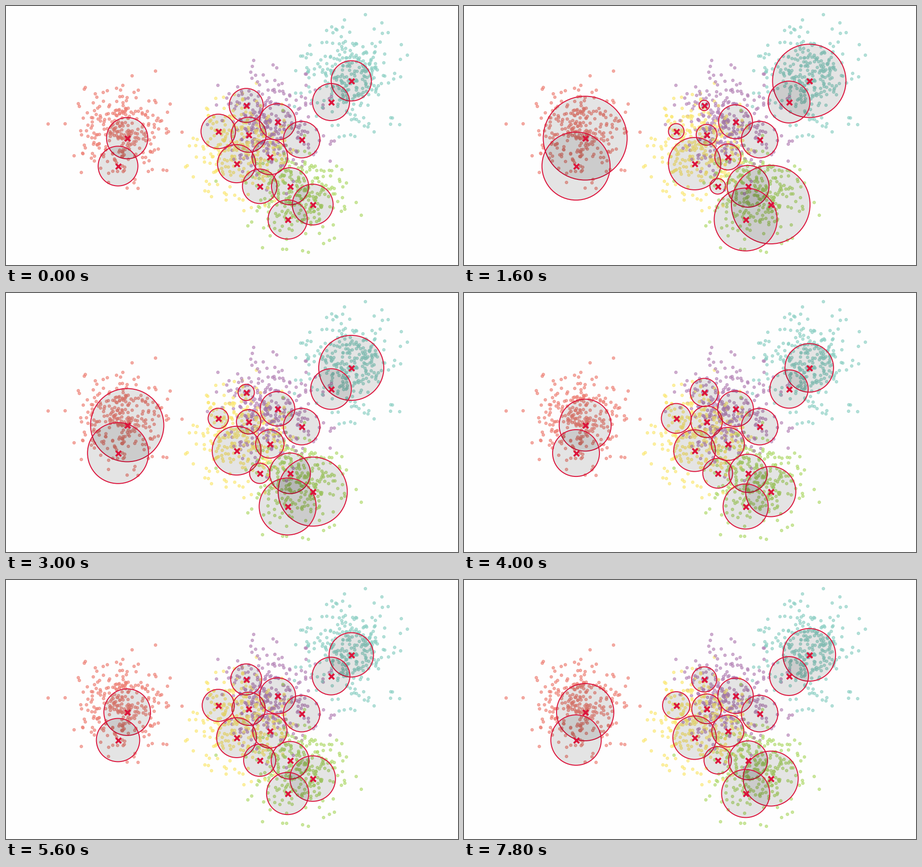
Write a matplotlib script that moves like this. It is 938 px wide and 538 px high and loops after 8 s.

```python
import numpy as np
import matplotlib.pyplot as plt
from matplotlib.animation import FuncAnimation
from matplotlib.patches import Circle

W, H, DPI = 938, 538, 72
FRAMES, INTERVAL, CYCLE = 40, 200, 9
PER_CLUSTER, SPREAD = 280, 48
CRIMSON = "#dc143c"

# colour and centre of each point cloud
CLUSTERS = [
    ("#ee8176", (243, 270)),
    ("#8dd0c5", (709, 150)),
    ("#b584b7", (545, 246)),
    ("#fbe873", (486, 295)),
    ("#b0da6c", (601, 392)),
]

# x, y and weight of each centroid
CENTROIDS = [
    (251, 274, 14), (232, 332, 11), (716, 155, 12), (674, 199, 6),
    (498, 206, 0), (440, 260, 1), (503, 267, 2), (563, 240, 4.5),
    (613, 277, 5), (478, 327, 8), (547, 313, 3), (526, 374, 1),
    (589, 374, 6), (636, 412, 13), (584, 443, 10),
]
BASE_RADIUS, BASE_WEIGHT = 38, 5
GAIN_START, GAIN_END = 0.54, 5.45


def make_points():
    rng = np.random.default_rng(7)
    points = np.vstack([rng.normal(centre, SPREAD, (PER_CLUSTER, 2))
                        for _, centre in CLUSTERS])
    colors = np.repeat([color for color, _ in CLUSTERS], PER_CLUSTER)
    order = rng.permutation(len(points))
    return points[order], colors[order]


def radius(weight, frame):
    """Heavier centroids grow and lighter ones shrink over each cycle."""
    t = frame % CYCLE / (CYCLE - 1)
    gain = GAIN_START + (GAIN_END - GAIN_START) * t
    return BASE_RADIUS + gain * (weight - BASE_WEIGHT)


fig = plt.figure(figsize=(W / DPI, H / DPI), dpi=DPI, facecolor="#fefefe")
ax = fig.add_axes([0, 0, 1, 1])
ax.set_xlim(-0.5, W - 0.5)
ax.set_ylim(H - 0.5, -0.5)
ax.axis("off")

points, colors = make_points()
ax.scatter(*points.T, s=34, c=colors, alpha=0.65, linewidths=1.2, zorder=1)

circles = [
    ax.add_patch(Circle((x, y), radius(weight, 0), facecolor=(0, 0, 0, 0.1),
                        edgecolor=CRIMSON, linewidth=2, zorder=2))
    for x, y, weight in CENTROIDS
]
xs, ys, weights = zip(*CENTROIDS)
ax.scatter(xs, ys, s=120, c=CRIMSON, marker="x", linewidths=4, zorder=3)


def update(frame):
    for circle, weight in zip(circles, weights):
        circle.set_radius(radius(weight, frame))
    return circles


anim = FuncAnimation(fig, update, frames=FRAMES, interval=INTERVAL,
                     repeat=True, repeat_delay=0, blit=False)
plt.show()
```
